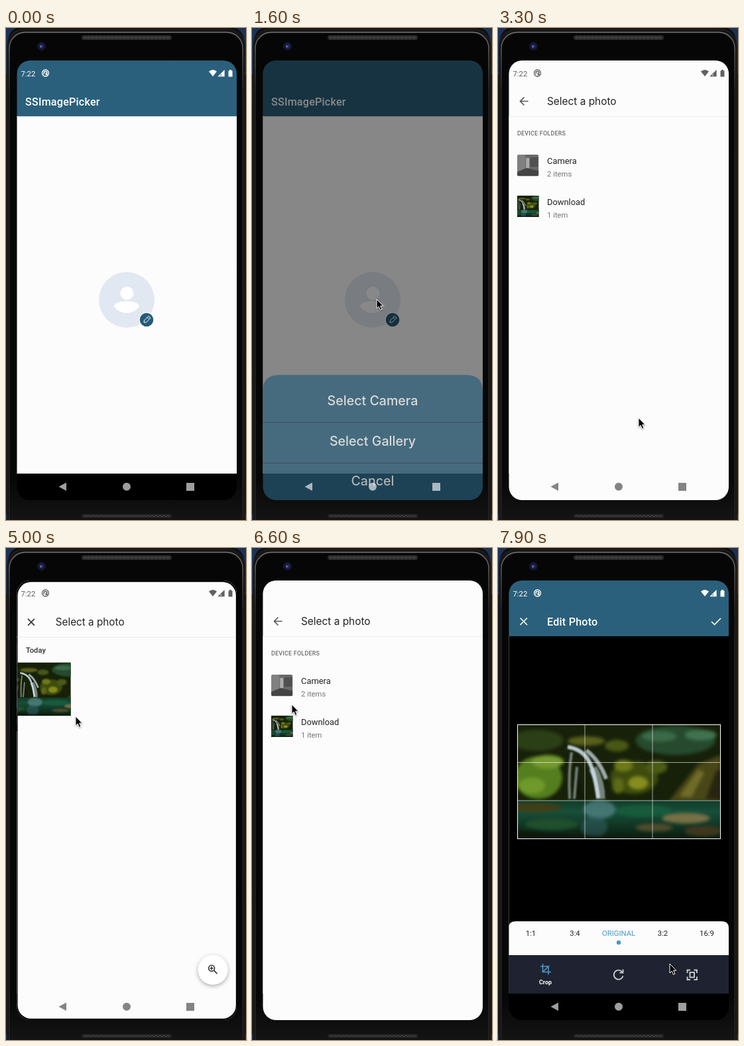
These frames come from a looping animation (362x742 px, 8000 ms). An HTML page:

```html
<!DOCTYPE html>
<html lang="en">
<head>
<meta charset="utf-8">
<title>Image picker demo</title>
<style>
  html, body { margin: 0; height: 100%; overflow: hidden; background: #101010; }
  svg { display: block; width: 362px; height: 742px; }
  text { font-family: Roboto, sans-serif; font-size: 11.3px; }
  .bar { font-size: 16.1px; font-weight: 500; letter-spacing: .22px; fill: #fff; }
  .title { font: 400 15.4px Inter, sans-serif; fill: #222; }
  .item { font: 500 19.6px Inter, sans-serif; fill: #fff; }
  .name { font-size: 12.9px; fill: #222; }
  .count { fill: #757575; }
  .mid { text-anchor: middle; }
  .bold { font-weight: 500; }
  .line { fill: none; stroke-width: 1.6; }
  #folders, #photos, #edit { transform-origin: 182px 380px; }
</style>
</head>
<body>
<svg viewBox="0 0 362 742">
  <defs>
    <linearGradient id="edge" x2="0" y2="1">
      <stop stop-color="#777"/><stop offset=".04" stop-color="#555"/><stop offset=".12" stop-color="#222"/>
    </linearGradient>
    <linearGradient id="shell" x2="0" y2="1">
      <stop stop-color="#060606"/><stop offset=".88" stop-color="#070707"/><stop offset=".97" stop-color="#151515"/>
    </linearGradient>
    <linearGradient id="water" x2="0" y2="1">
      <stop stop-color="#123c28"/><stop offset=".3" stop-color="#174f3a"/><stop offset="1" stop-color="#0b1c0d"/>
    </linearGradient>
    <pattern id="mesh" width="6" height="2" patternUnits="userSpaceOnUse">
      <path d="M0 .5h3M3 1.5h3" stroke="#4a4a4a"/>
    </pattern>
    <filter id="soft" color-interpolation-filters="sRGB"><feGaussianBlur stdDeviation="2.5"/></filter>
    <filter id="mist" color-interpolation-filters="sRGB"><feGaussianBlur stdDeviation=".9"/></filter>
    <filter id="shadow" x="-30%" y="-30%" width="160%" height="160%">
      <feDropShadow dx="0" dy="2" stdDeviation="3" flood-opacity=".35"/>
    </filter>
    <clipPath id="screen"><rect x="16.5" y="49" width="331.5" height="663" rx="20"/></clipPath>

    <symbol id="fall" viewBox="0 0 306 172" preserveAspectRatio="xMidYMid slice">
      <rect width="306" height="172" fill="#172109"/>
      <g filter="url(#soft)">
        <ellipse cx="30" cy="24" rx="40" ry="16" fill="#2b3f16"/>
        <ellipse cx="32" cy="80" rx="36" ry="32" fill="#557f1e"/>
        <ellipse cx="46" cy="56" rx="24" ry="10" fill="#769a30"/>
        <ellipse cx="22" cy="92" rx="20" ry="12" fill="#6f9a2b"/>
        <ellipse cx="104" cy="25" rx="28" ry="7" fill="#5a601c"/>
        <ellipse cx="150" cy="32" rx="18" ry="9" fill="#485814"/>
        <ellipse cx="176" cy="80" rx="36" ry="25" fill="#3f4c0e"/>
        <ellipse cx="160" cy="62" rx="14" ry="9" fill="#6e7a18"/>
        <ellipse cx="182" cy="88" rx="15" ry="10" fill="#858d1e"/>
        <ellipse cx="152" cy="92" rx="9" ry="12" fill="#5c6915"/>
        <ellipse cx="210" cy="64" rx="16" ry="10" fill="#4b5b16"/>
        <ellipse cx="238" cy="24" rx="60" ry="22" fill="#264a2e"/>
        <ellipse cx="214" cy="18" rx="26" ry="8" fill="#3a6a48"/>
        <ellipse cx="276" cy="16" rx="24" ry="8" fill="#40724f"/>
        <path d="M228 116L272 60 306 46V116Z" fill="#494617"/>
        <path d="M244 108L272 68 282 72 262 110Z" fill="#706c28"/>
        <path d="M284 112L300 68 306 70V114Z" fill="#282410"/>
        <path d="M88 62L102 112H90Z" fill="#12190a"/>
      </g>
      <rect y="114" width="306" height="58" fill="url(#water)"/>
      <g filter="url(#soft)">
        <ellipse cx="26" cy="125" rx="42" ry="7" fill="#413f17"/>
        <ellipse cx="124" cy="128" rx="24" ry="14" fill="#6b9aa3" opacity=".55"/>
        <ellipse cx="116" cy="154" rx="20" ry="16" fill="#37646c" opacity=".5"/>
        <ellipse cx="190" cy="130" rx="42" ry="9" fill="#175b3c"/>
        <ellipse cx="52" cy="150" rx="40" ry="9" fill="#1f4f2c"/>
        <ellipse cx="254" cy="141" rx="36" ry="8" fill="#777045"/>
        <ellipse cx="206" cy="155" rx="28" ry="6" fill="#4f4c2a"/>
        <ellipse cx="280" cy="160" rx="28" ry="8" fill="#3f3620"/>
        <path d="M0 160Q60 166 200 172H0Z" fill="#0f180a"/>
      </g>
      <g fill="none" stroke="#d6e5f0" filter="url(#mist)">
        <path d="M76 34Q96 37 106 52T122 111" stroke-width="6" opacity=".85"/>
        <path d="M104 39Q124 54 134 82" stroke-width="6" opacity=".7"/>
        <path d="M82 42Q77 72 79 112M90 64L86 112" stroke-width="4" opacity=".5"/>
        <path d="M114 66Q126 88 126 112" stroke-width="13" opacity=".5"/>
      </g>
    </symbol>

    <symbol id="room" viewBox="0 0 32 32">
      <rect width="32" height="32" fill="#686868"/>
      <path d="M0 0H12V20L0 25Z" fill="#808080"/><path d="M13 5H18V20H13Z" fill="#aaa"/>
      <path d="M19 4H31V18H19Z" fill="#505050"/><path d="M0 26L14 20 32 24V32H0Z" fill="#444"/>
    </symbol>
  </defs>

  <path d="M0 0H16Q3 4 2 26V70H0ZM362 0H346Q359 4 360 26V70H362ZM0 732L6 742H0ZM362 732L356 742H362Z" fill="#1d3154"/>
  <rect x="1.500" y="1.500" width="359" height="775" rx="26" fill="#171717" stroke="#202020"/>
  <rect x="5" y="6.500" width="352" height="765" rx="24" fill="url(#shell)" stroke="url(#edge)" stroke-width="1.500"/>
  <rect x="114" y="11" width="136" height="7" rx="3.500" fill="#2a2a2a"/>
  <rect x="117" y="13" width="130" height="3" fill="url(#mesh)"/>
  <rect x="114" y="733" width="136" height="6" rx="3" fill="#242424"/>
  <rect x="117" y="735" width="130" height="2" fill="url(#mesh)"/>
  <circle cx="53.500" cy="27.500" r="6.500" fill="#17172a"/><circle cx="53.500" cy="27.500" r="3" fill="#2b2d72"/>
  <circle cx="52.500" cy="28" r="1.200" fill="#7d83c8"/>

  <g clip-path="url(#screen)">
    <rect x="16" y="49" width="333" height="664"/>

    <g id="home">
      <rect x="16" y="133" width="333" height="539" fill="#fcfcfc"/>
      <rect x="16" y="133" width="333" height="1" fill="#dcdcdc"/>
      <rect x="16" y="49" width="333" height="84" fill="#2b607c"/>
      <text class="bar" x="29" y="117">SSImagePicker</text>
      <circle cx="182" cy="410" r="42" fill="#e2e8f1"/>
      <g fill="#fff">
        <circle cx="182.500" cy="400" r="10"/>
        <path d="M163 420c0-6 12-8 19-8s19 2 19 8a23 23 0 0 1-38 0z"/>
        <circle cx="212" cy="440" r="11.500"/>
      </g>
      <circle cx="212" cy="440" r="10.300" fill="#255b77"/>
      <path d="M208 444l.5-3 6-6q1.500-.500 2.500 1t.500 2l-6 6zM213 436.500l2.500 2.500" fill="none" stroke="#fff"/>
    </g>
    <rect id="scrim" x="16" y="49" width="333" height="664"/>

    <g id="sheet">
      <path d="M16 194V25Q16 0 41 0H323Q348 0 348 25V194Z" fill="#2b607c"/>
      <path d="M16 71.500H348M16 133H348" stroke="#173443"/>
      <g class="mid">
        <text class="item" x="182" y="46">Select Camera</text>
        <text class="item" x="182" y="107">Select Gallery</text>
        <text class="item" x="182" y="167">Cancel</text>
      </g>
    </g>

    <g id="folders">
      <rect x="0" y="0" width="362" height="742" fill="#fcfcfc"/>
      <path class="line" d="M45.500 110.500H34M39.500 104.500l-6 6 6 6" stroke="#555"/>
      <text class="title" x="74" y="116">Select a photo</text>
      <path d="M16 133.500H348" stroke="#eaeaea"/>
      <text class="bold" x="29" y="162" fill="#6c6c6c" style="font-size:8.9px;letter-spacing:.25px">DEVICE FOLDERS</text>
      <rect x="29" y="191" width="32.500" height="32.500" rx="3" fill="#e6e6ea"/>
      <rect x="29" y="252.500" width="32.500" height="32.500" rx="3" fill="#e6e6ea"/>
      <text class="name" x="74" y="205">Camera</text>
      <text class="name" x="74" y="266.500">Download</text>
      <g id="loaded">
        <g style="clip-path:inset(0 round 3px)"><use href="#room" x="29" y="191" width="32.500" height="32.500"/></g>
        <g style="clip-path:inset(0 round 3px)"><use href="#fall" x="29" y="252.500" width="32.500" height="32.500"/></g>
        <text class="count" x="74" y="224">2 items</text>
        <text class="count" x="74" y="285.500">1 item</text>
      </g>
    </g>

    <rect id="backdrop" x="16" y="49" width="333" height="664"/>
    <g id="photos">
      <rect x="16.500" y="49" width="331.500" height="663" rx="20" fill="#fcfcfc"/>
      <path class="line" d="M32 105l10 10M42 105l-10 10" stroke="#333"/>
      <text class="title" x="74" y="115.500">Select a photo</text>
      <path d="M16 133H348" stroke="#eaeaea"/>
      <text class="bold" x="29" y="156.500" fill="#333">Today</text>
      <use href="#fall" x="16" y="171" width="81" height="81"/>
      <circle cx="313" cy="638" r="22.500" fill="#fff" filter="url(#shadow)"/>
      <g class="line" stroke="#333">
        <circle cx="311" cy="635.500" r="4.500"/><path d="M314.500 639l5 5M308.500 635.500h5M311 633v5"/>
      </g>
    </g>

    <g id="edit">
      <rect x="16" y="49" width="333" height="664"/>
      <rect x="16" y="49" width="333" height="84" fill="#2b607c"/>
      <path class="line" d="M33.500 105.500l10.500 10.500M44 105.500L33.500 116M322 111l4.500 4.500 9.500-9.500" stroke="#fff"/>
      <text class="bar" x="74" y="117">Edit Photo</text>
      <use href="#fall" x="29" y="266" width="306.500" height="172.500"/>
      <path d="M131 267V438M233 267V438M30 323.500H335M30 381H335" stroke="#fff" stroke-opacity=".6"/>
      <rect x="29.500" y="266.500" width="306" height="172" fill="none" stroke="#fff"/>
      <path d="M16 614V573Q16 563 26 563H338Q348 563 348 573V614Z" fill="#fcfcfc"/>
      <g class="mid" fill="#222">
        <text x="49.500" y="585">1:1</text><text x="116" y="585">3:4</text>
        <text x="182" y="585" fill="#4a9ac4">ORIGINAL</text>
        <text x="248.500" y="585">3:2</text><text x="315" y="585">16:9</text>
      </g>
      <circle cx="182" cy="595" r="3.200" fill="#4a9ac4"/>
      <rect x="16" y="614" width="333" height="58" fill="#1f2230"/>
      <path class="line" d="M67.500 627V639.500H80M64 631H76V643.500M67 640L77 630" stroke="#4a9ac4"/>
      <text class="mid" x="71.500" y="658" fill="#fff" style="font-size:9px;font-weight:700">Crop</text>
      <g class="line" stroke="#c9cbd2" style="stroke-width:1.9">
        <path d="M187 639a7 7 0 1 0 1.500 6.500M188.500 635.500v5h-5"/>
        <path d="M285.500 641v-4.500h4.500M295.500 636.500h4.500v4.500M300 646.500v4.500h-4.500M290 651h-4.500v-4.500"/>
        <rect x="289.500" y="640" width="6.500" height="7.500"/>
      </g>
    </g>

    <g id="status" fill="currentColor">
      <text x="22.500" y="72.500">7:22</text>
      <g fill="none" stroke="currentColor" stroke-width="1.300">
        <circle cx="59.500" cy="68" r="5"/><path d="M57 70v-2a2.500 2.500 0 1 1 2.500 2.500M59.500 68l3.500 3.500"/>
        <path d="M321 72.500L329 64.500V72.500Z"/>
      </g>
      <path d="M306 65.500q6-5 12 0l-6 7.500zM325 68.500l4-4v8.500h-4zM335.500 64.500h1.500v-1.500h3v1.500h1.500v9h-6z"/>
    </g>
    <path id="nav" d="M91 685.500V698L79.500 691.700ZM176 691.700a6 6 0 1 0 12 0a6 6 0 1 0-12 0M272 686h12v12h-12z"/>

    <rect id="dim" x="16" y="49" width="333" height="664"/>
    <g id="dialog">
      <rect x="22.500" y="344" width="319.500" height="72.500" fill="#f4f4f4" filter="url(#shadow)"/>
      <text class="bold" x="42" y="375.500" fill="#222">Preparing selected files</text>
      <path d="M307 361.500l10.500 10.500M317.500 361.500L307 372" stroke="#555" stroke-width="1.300"/>
    </g>
  </g>

  <g id="cursor">
    <path d="M0 0V14L3.200 11.200 5.500 16.400 7.900 15.300 5.700 10.200H9.900Z" stroke="#fff"
      style="filter:drop-shadow(0 1px 1px #0006)"/>
  </g>
</svg>
<script>
const LOOP = 8000, STEP = 100;
const el = id => document.getElementById(id);
const ramp = (t, a, b) => Math.min(1, Math.max(0, (t - a) / (b - a)));
const easeOut = u => 1 - (1 - u) ** 2;
const smooth = u => u * u * (3 - 2 * u);
const fade = (id, opacity) => { el(id).style.opacity = opacity; };
const zoom = (id, scale) => { el(id).style.transform = `scale(${scale})`; };

// time, x, y of the pointer tip
const path = [
  [200, 362, 512], [1000, 188, 409], [1600, 188, 409], [2200, 212, 588], [3400, 212, 588],
  [4300, 105, 254], [5400, 105, 254], [5600, 60, 227], [6100, 60, 227], [6500, 60, 236],
  [6800, 60, 236], [7700, 259, 627]
];

function pointer(t) {
  const next = path.findIndex(p => p[0] > t);
  if (next < 0) return path[path.length - 1].slice(1);
  if (next === 0) return path[0].slice(1);
  const [t0, x0, y0] = path[next - 1], [t1, x1, y1] = path[next];
  const u = smooth(ramp(t, t0, t1));
  return [x0 + (x1 - x0) * u, y0 + (y1 - y0) * u];
}

function draw(t) {
  // bottom sheet
  const sheet = easeOut(ramp(t, 1300, 1835)) * (1 - ramp(t, 2200, 2600));
  el('sheet').style.transform = `translateY(${478 + 234 * (1 - sheet)}px)`;
  fade('sheet', sheet ** 1.7);
  fade('scrim', sheet * .58);

  // folder list
  const foldersAlpha = ramp(t, 2500, 2800) * (1 - ramp(t, 6600, 6900));
  const back = t > 5700 ? 1 - easeOut(ramp(t, 5800, 6120)) : easeOut(ramp(t, 4400, 5216));
  fade('folders', foldersAlpha);
  zoom('folders', .9 + .1 * easeOut(ramp(t, 2400, 3200)) + .1 * back - .1 * ramp(t, 6600, 6900));
  fade('loaded', t >= 2900 && t < 5800 || t >= 6300 ? 1 : 0);

  // photo grid
  const photosAlpha = ramp(t, 4350, 4650) * (1 - ramp(t, 5800, 6000));
  fade('photos', photosAlpha);
  fade('backdrop', photosAlpha);
  zoom('photos', .9 + .1 * easeOut(ramp(t, 4400, 5216)) - .1 * ramp(t, 5800, 6000));

  // progress dialog
  const dialog = ramp(t, 5850, 6000) * (1 - ramp(t, 6300, 6500));
  fade('dialog', dialog);
  fade('dim', dialog * .36);

  // crop screen
  fade('edit', ramp(t, 6950, 7250));
  zoom('edit', .9 + .1 * easeOut(ramp(t, 6950, 7600)));

  // system bars
  const light = foldersAlpha < .5, hidden = sheet > 0 || t >= 6500 && !light;
  fade('status', hidden ? 0 : 1);
  el('status').style.color = light ? '#fff' : '#616161';
  el('nav').setAttribute('fill', light ? '#fff' : '#000');
  fade('nav', t >= 6500 && !light ? 0 : light ? .62 : .48);

  const [x, y] = pointer(t);
  el('cursor').style.transform = `translate(${x}px, ${y}px)`;
  fade('cursor', t < 300 ? 0 : 1);
}

function tick() {
  draw(Math.floor(performance.now() % LOOP / STEP) * STEP);
  requestAnimationFrame(tick);
}
tick();
</script>
</body>
</html>
```
